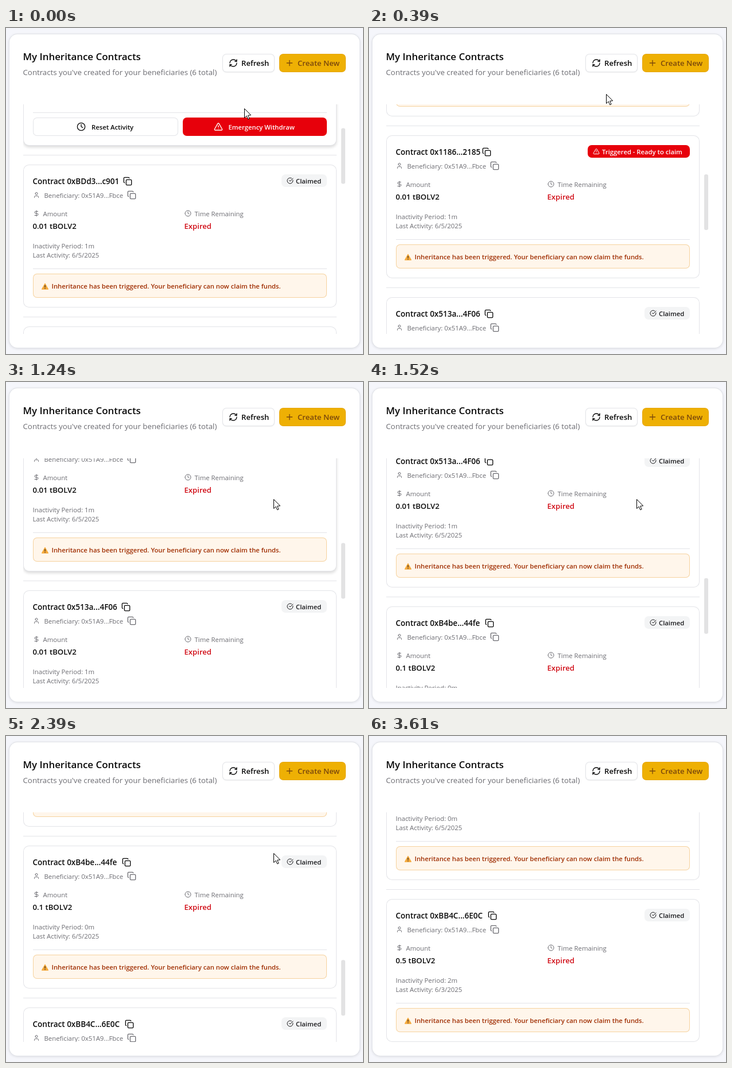
These frames come from a looping animation (622x568 px, 3.64 s). An HTML page with a canvas:

```html
<!DOCTYPE html>
<html lang="en">
<head>
<meta charset="utf-8">
<title>Inheritance contracts</title>
<style>
  html, body { margin: 0; width: 100%; height: 100%; overflow: hidden; background: #f5f6fb; }
  canvas { display: block; }
</style>
</head>
<body>
<canvas id="stage" width="622" height="568"></canvas>
<script>
const ctx = document.getElementById('stage').getContext('2d');
const LOOP = 3640;
const VIEW = { x: 30, y: 133, w: 562, h: 400 };
const PITCH = 282, CARD_H = 249;
const INK = '#0a0a0a', MUTED = '#6c6c72', LINE = '#e3e4e8', RED = '#e7000b', RUST = '#9f2d00';

const ICONS = {
  copy: 'M10 8h10a2 2 0 0 1 2 2v10a2 2 0 0 1-2 2H10a2 2 0 0 1-2-2V10a2 2 0 0 1 2-2zM4 16c-1.1 0-2-.9-2-2V4c0-1.1.9-2 2-2h10c1.1 0 2 .9 2 2',
  user: 'M19 21v-2a4 4 0 0 0-4-4H9a4 4 0 0 0-4 4v2M8 7a4 4 0 1 0 8 0a4 4 0 1 0-8 0',
  dollar: 'M12 2v20M17 5H9.5a3.5 3.5 0 0 0 0 7h5a3.5 3.5 0 0 1 0 7H6',
  clock: 'M2 12a10 10 0 1 0 20 0a10 10 0 1 0-20 0M12 6v6l4 2',
  check: 'M21.8 10A10 10 0 1 1 17 3.34M9 11l3 3L22 4',
  alert: 'M21.73 18l-8-14a2 2 0 0 0-3.48 0l-8 14A2 2 0 0 0 4 21h16a2 2 0 0 0 1.73-3M12 9v4M12 17h.01',
  refresh: 'M3 12a9 9 0 0 1 9-9 9.75 9.75 0 0 1 6.74 2.74L21 8M21 3v5h-5M21 12a9 9 0 0 1-9 9 9.75 9.75 0 0 1-6.74-2.74L3 16M8 16H3v5',
  plus: 'M5 12h14M12 5v14'
};
for (const name in ICONS) ICONS[name] = new Path2D(ICONS[name]);

const CARDS = [
  { id: '0xBDd3...c901', copyX: 212, amount: '0.01', period: '1m', date: '6/5/2025' },
  { id: '0x1186...2185', copyX: 205, amount: '0.01', period: '1m', date: '6/5/2025', ready: true },
  { id: '0x513a...4F06', copyX: 209, amount: '0.01', period: '1m', date: '6/5/2025' },
  { id: '0xB4be...44fe', copyX: 210, amount: '0.1', period: '0m', date: '6/5/2025' },
  { id: '0xBB4C...6E0C', copyX: 215, amount: '0.5', period: '2m', date: '6/3/2025' }
];

// time, offset, velocity
const SCROLL = [
  [0, 0, .95], [250, 250, .9], [380, 333, 0],
  [1110, 333, 0], [1240, 439, 1], [1520, 693, .7], [1650, 733, 0],
  [2215, 733, 0], [2330, 830, 1], [2540, 1045, .8], [2620, 1082, 0]
];
// time, x, y
const POINTER = [
  [0, 415, 140], [330, 413, 115], [620, 413, 115], [960, 466, 204],
  [2540, 466, 204], [2700, 474, 163], [2800, 474, 163], [2900, 506, 46]
];

const clamp = v => Math.max(0, Math.min(1, v));
const ramp = (t, from, to) => clamp((t - from) / (to - from));
const smooth = u => u * u * (3 - 2 * u);

function segment(keys, t) {
  let i = 0;
  while (i < keys.length - 2 && t >= keys[i + 1][0]) i++;
  const a = keys[i], b = keys[i + 1];
  return { a, b, u: ramp(t, a[0], b[0]) };
}

function scrollAt(t) {
  const { a, b, u } = segment(SCROLL, t);
  const span = b[0] - a[0], k = smooth(u);
  return a[1] * (1 - k) + b[1] * k
    + span * u * (1 - u) * (a[2] * (1 - u) - b[2] * u);
}

function pointerAt(t) {
  const { a, b, u } = segment(POINTER, t), k = smooth(u);
  return [a[1] + (b[1] - a[1]) * k, a[2] + (b[2] - a[2]) * k];
}

function text(str, x, y, px, color, bold) {
  ctx.font = `${bold ? 600 : 400} ${px * (bold ? .939 : .948)}px "Open Sans", "Noto Sans", sans-serif`;
  ctx.fillStyle = color;
  ctx.fillText(str, x, y);
}

function icon(name, cx, cy, size, color) {
  ctx.save();
  ctx.translate(cx - size / 2, cy - size / 2);
  ctx.scale(size / 24, size / 24);
  ctx.lineWidth = 2;
  ctx.lineCap = ctx.lineJoin = 'round';
  ctx.strokeStyle = color;
  ctx.stroke(ICONS[name]);
  ctx.restore();
}

function box(x, y, w, h, r, fill, border, shadow) {
  ctx.save();
  if (shadow) {
    ctx.shadowColor = `rgba(0,0,0,${shadow.alpha})`;
    ctx.shadowBlur = shadow.blur;
    ctx.shadowOffsetY = shadow.dy;
  }
  ctx.beginPath();
  ctx.roundRect(x, y, w, h, r);
  ctx.fillStyle = border || fill;
  ctx.fill();
  ctx.restore();
  if (!border) return;
  ctx.beginPath();
  ctx.roundRect(x + 1, y + 1, w - 2, h - 2, r - 1);
  ctx.fillStyle = fill;
  ctx.fill();
}

function rule(x, y, w) {
  ctx.fillStyle = LINE;
  ctx.fillRect(x, y, w, 1);
}

function cardFrame(top, hover) {
  box(30, top, 546, CARD_H, 10, '#fff', LINE, hover > 0 && { alpha: .14 * hover, blur: 5, dy: 3 });
  rule(30, top + 265, 546);
}

function warningSign(cx, cy) {
  ctx.beginPath();
  ctx.moveTo(cx, cy - 4.5);
  ctx.lineTo(cx + 5.3, cy + 5);
  ctx.lineTo(cx - 5.3, cy + 5);
  ctx.closePath();
  ctx.lineJoin = 'round';
  ctx.lineWidth = 1.4;
  ctx.fillStyle = ctx.strokeStyle = '#f5a93b';
  ctx.fill();
  ctx.stroke();
  ctx.fillStyle = '#4a3423';
  ctx.fillRect(cx - .7, cy - 2, 1.4, 4);
  ctx.fillRect(cx - .7, cy + 3, 1.4, 1.4);
}

function badge(top, ready) {
  const x = ready ? 381 : 480, color = ready ? '#fff' : '#18181b';
  box(x, top + 17, 559 - x, 22, 7, ready ? RED : '#f3f4f5');
  icon(ready ? 'alert' : 'check', x + 15, top + 28, 12, color);
  text(ready ? 'Triggered - Ready to claim' : 'Claimed', x + 25, top + 33, 12, color, true);
}

function contractCard(card, top, hover) {
  cardFrame(top, hover);
  text('Contract ' + card.id, 46.5, top + 34, 14.4, INK, true);
  icon('copy', card.copyX, top + 29, 16, INK);
  badge(top, card.ready);

  icon('user', 53, top + 53, 12, MUTED);
  text('Beneficiary: 0x51A9...Fbce', 66.5, top + 58, 12, MUTED);
  icon('copy', 219, top + 53, 16, MUTED);

  icon('dollar', 53, top + 85, 12, MUTED);
  text('Amount', 64.5, top + 90, 12, MUTED);
  text(card.amount + ' tBOLV2', 46.5, top + 112, 14, INK, true);
  icon('clock', 317, top + 85, 12, MUTED);
  text('Time Remaining', 328.5, top + 90, 12, MUTED);
  text('Expired', 310.5, top + 112, 14, '#d00a14', true);

  text('Inactivity Period: ' + card.period, 46.5, top + 146, 12, MUTED);
  text('Last Activity: ' + card.date, 46.5, top + 162, 12, MUTED);
  rule(47, top + 181, 512);

  box(47, top + 190, 512, 42, 7, '#fff6eb', '#f6d29e');
  warningSign(68, top + 212);
  text('Inheritance has been triggered. Your beneficiary can now claim the funds.',
    79.5, top + 216, 12, RUST, true);
}

function activeCard(top, hover) {
  cardFrame(top, hover);
  rule(47, top + 191, 512);
  box(47, top + 200, 253, 32, 7, '#fff', LINE);
  icon('clock', 131, top + 216, 16, INK);
  text('Reset Activity', 149, top + 221, 12, INK, true);
  box(308, top + 200, 251, 32, 7, RED);
  icon('alert', 370, top + 216, 16, '#fff');
  text('Emergency Withdraw', 387.5, top + 221, 12, '#fff', true);
}

function header() {
  ctx.fillStyle = '#f5f6fb';
  ctx.fillRect(0, 0, 622, 568);
  box(5, 10, 612, 548, 15, '#fff', '#e1e3e8', { alpha: .1, blur: 4, dy: 1 });
  text('My Inheritance Contracts', 29.5, 56, 18, INK, true);
  text("Contracts you've created for your beneficiaries (6 total)", 29.5, 82, 14, MUTED);
  box(377, 45, 91, 32, 7, '#fff', LINE, { alpha: .06, blur: 2, dy: 1 });
  icon('refresh', 396, 61, 16, INK);
  text('Refresh', 410, 66, 14, INK, true);
  box(476, 45, 116, 32, 7, '#eeb004', '#e6a609');
  icon('plus', 494, 61, 16, '#7b480c');
  text('Create New', 508, 66, 14, '#7b480c', true);
}

function list(t) {
  const offset = Math.round(scrollAt(t));
  const hover = [0, ramp(t, 760, 910) - ramp(t, 1370, 1520), 0,
    ramp(t, 2580, 2710) - ramp(t, 2870, 3020), 0];
  ctx.save();
  ctx.beginPath();
  ctx.rect(VIEW.x, VIEW.y, VIEW.w, VIEW.h);
  ctx.clip();
  activeCard(-44 - offset, 1);
  CARDS.forEach((card, i) => {
    const top = 238 + i * PITCH - offset;
    if (top < VIEW.y + VIEW.h && top + PITCH > VIEW.y) contractCard(card, top, hover[i]);
  });
  ctx.globalAlpha = 1 - ramp(t, 3320, 3520);
  box(584, 174.5 + offset * .2415, 7, 97, 3, '#e2e2e3');
  ctx.restore();
}

function pointer(t) {
  if (t > 2900) return;
  const [x, y] = pointerAt(t);
  ctx.save();
  ctx.translate(Math.round(x) + .5, Math.round(y) + .5);
  ctx.beginPath();
  ctx.moveTo(0, 0);
  [[0, 16], [3.7, 12.6], [6.2, 18.3], [8.6, 17.3], [6.2, 11.7], [11.2, 11.3]]
    .forEach(([px, py]) => ctx.lineTo(px, py));
  ctx.closePath();
  ctx.fillStyle = '#fff';
  ctx.strokeStyle = '#000';
  ctx.lineWidth = 1;
  ctx.fill();
  ctx.stroke();
  ctx.restore();
}

let start;
function draw(now) {
  start ??= now;
  const t = (now - start) % LOOP;
  header();
  list(t);
  pointer(t);
  requestAnimationFrame(draw);
}
requestAnimationFrame(draw);
</script>
</body>
</html>
```
